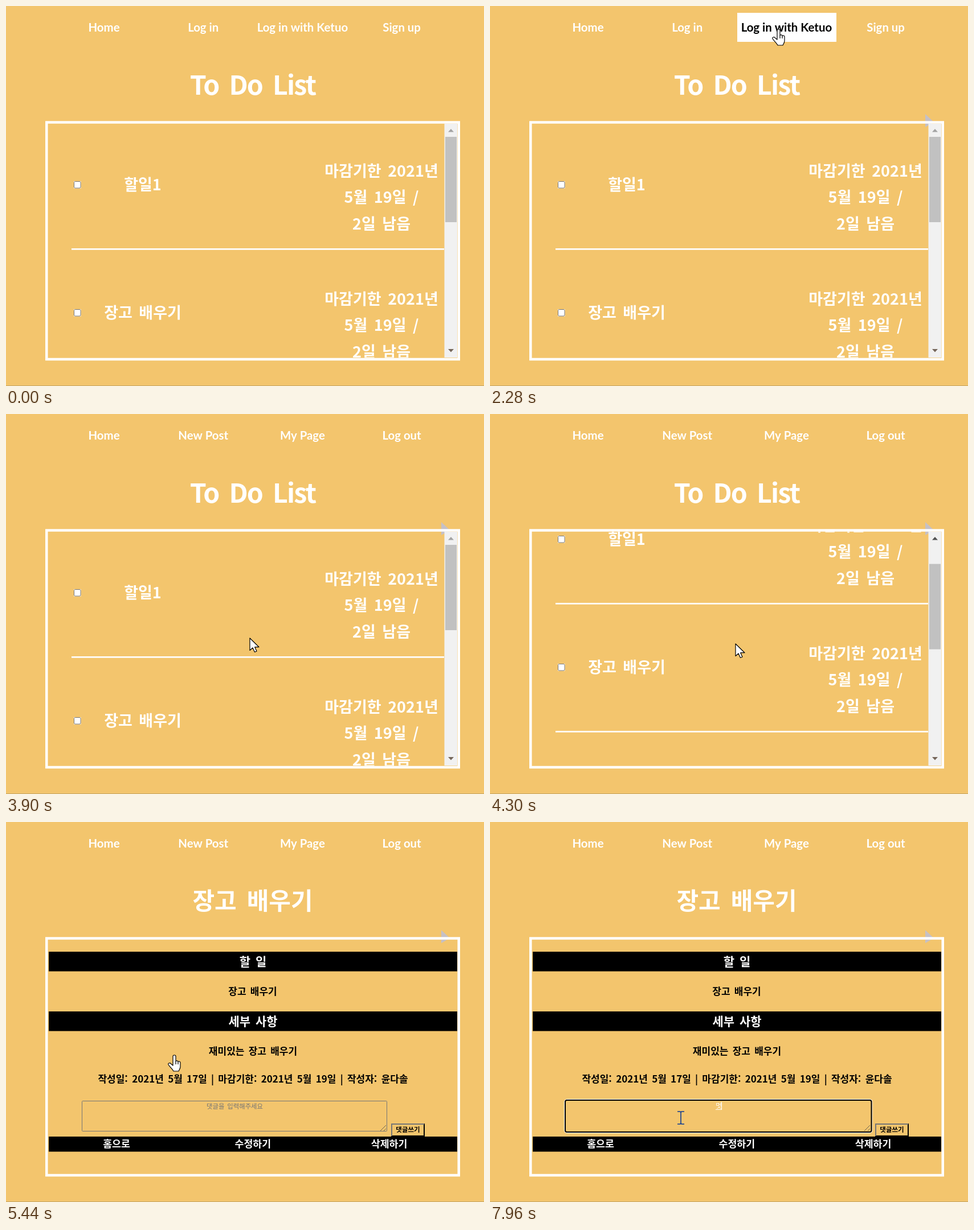
Animation, 839 px wide and 668 px high, one loop 8000 ms. Source, as an HTML page with a canvas:

```html
<!DOCTYPE html>
<html lang="ko">
<head>
<meta charset="utf-8">
<title>To Do List</title>
<style>
  html, body { margin: 0; width: 100%; height: 100%; overflow: hidden; background: #f3c56d; }
  canvas { display: block; width: 100%; height: 100%; }
</style>
</head>
<body>
<canvas id="stage" width="839" height="668"></canvas>
<script>
const ctx = document.getElementById('stage').getContext('2d');
const LOOP = 8000;
const BG = '#f3c56d';
const KR = '"Noto Sans CJK KR", "Noto Sans CJK", sans-serif';
const NAV = 'Lato, "Open Sans", sans-serif';

const LOGIN = 3170, DETAIL = 5440, FOCUS = 6300, TYPED = 6900;

// Pointer moves: start, end, position after each step
const moves = [
  [1070, 1760, [[815, 211], [764, 190], [712, 161], [660, 131], [615, 109], [575, 91],
                [545, 77], [526, 68], [518, 58], [509, 46], [505, 41]]],
  [3630, 3970, [[503, 50], [489, 140], [466, 255], [444, 345], [428, 394], [431, 404]]],
  [4580, 4830, [[415, 405], [380, 408], [338, 410], [307, 411], [294, 410]]],
  [5840, 6050, [[305, 445], [330, 495], [340, 518], [343, 523]]],
  [6440, 6900, [[337, 522], [332, 522], [331, 521], [333, 520], [335, 520], [335, 520], [335, 520]]]
];
const clicks = [[2150, 2280], [5110, 5240], [FOCUS, 6575]];

const arrow = new Path2D('M0 0V21.5L5 17L8.5 24.5L12 23L8.7 15.7H16Z');
const hand = new Path2D('M-1 2C-1 -1 4 -1 4 2V11C4 9 8 9 8 12C8 10 12 10.5 12 13V20' +
  'C12 24 10 25 9 28H0C-1 25 -7 20 -9 16.5C-10 13.5 -6 12.5 -4 15.5L-1 18Z');
const fingers = new Path2D('M4 11V16M8 12V16');
const beam = new Path2D('M-6 -11H-1.5L0 -10L1.5 -11H6M0 -10V10M-6 11H-1.5L0 10L1.5 11H6');

const within = (t, a, b) => t >= a && t < b;

function rect(x, y, w, h, color) {
  ctx.fillStyle = color;
  ctx.fillRect(x, y, w, h);
}

function frame(x, y, w, h, line, color, radius = 0) {
  ctx.beginPath();
  ctx.roundRect(x, y, w, h, radius);
  ctx.lineWidth = line;
  ctx.strokeStyle = color;
  ctx.stroke();
}

// Text centred on (x, y); word and letter spacing in em
function text(str, x, y, size, { color = '#fff', font = KR, weight = 700, words = 0.2, letters = 0 } = {}) {
  ctx.font = `${weight} ${size}px ${font}`;
  ctx.wordSpacing = words * size + 'px';
  ctx.letterSpacing = letters * size + 'px';
  ctx.textAlign = 'center';
  ctx.fillStyle = color;
  ctx.fillText(str, x, y + size * 0.375);
}

function triangle(color, ...p) {
  ctx.beginPath();
  ctx.moveTo(p[0], p[1]);
  ctx.lineTo(p[2], p[3]);
  ctx.lineTo(p[4], p[5]);
  ctx.fillStyle = color;
  ctx.fill();
}

function pointer(t) {
  let pos = null;
  for (const [start, end, steps] of moves) {
    if (t < start) break;
    const i = Math.floor((t - start + 2) / (end - start) * (steps.length - 1));
    pos = steps[Math.min(i, steps.length - 1)];
  }
  return pos;
}

function scrollTop(t) {
  if (t < 4230) return 0;
  if (t < 4300) return 32;
  return t < 4370 ? 94 : 137;
}

function nav(t, hover) {
  const items = t < LOGIN
    ? ['Home', 'Log in', 'Log in with Ketuo', 'Sign up']
    : ['Home', 'New Post', 'My Page', 'Log out'];
  if (hover) rect(434, 12, 174, 51, '#fff');
  items.forEach((label, i) => {
    const color = hover && i === 2 ? '#000' : '#fff';
    text(label, 172 + i * 174.2, 37.5, 20.4, { font: NAV, color, words: 0 });
  });
}

function row(name, y, hover) {
  if (hover) rect(136, y - 23, 209, 47, '#fff');
  rect(119, y - 6, 12.5, 12.5, '#fff');
  frame(119.5, y - 5.5, 11.5, 11.5, 1, '#767676', 2);
  text(name, 240, y, 27, { color: hover ? '#000' : '#fff' });
  ['마감기한 2021년', '5월 19일 /', '2일 남음'].forEach((line, i) =>
    text(line, 659, y - 24.5 + i * 46.5, 27));
  rect(115, y + 112, 654, 2.7, '#fff');
}

function scrollbar(top) {
  rect(769.5, 207, 22.5, 411, '#f1f1f1');
  rect(771, 230 + top * 0.357, 20, 150, '#c1c1c1');
  triangle(top ? '#505050' : '#a3a3a3', 776, 221.5, 781, 216, 786, 221.5);
  triangle('#75665a', 776, 603, 781, 608.5, 786, 603);
}

function listPage(t, hover) {
  const top = scrollTop(t);
  text('To Do List', 433, 139, 46.5, { letters: -0.04 });
  ctx.save();
  ctx.beginPath();
  ctx.rect(74, 207, 718, 411.5);
  ctx.clip();
  ['할일1', '장고 배우기', '할일2'].forEach((name, i) =>
    row(name, 314 + i * 225 - top, hover && i === 1));
  scrollbar(top);
  ctx.restore();
}

function commentBox(t) {
  if (t < FOCUS) {
    frame(133.5, 490.5, 535, 53, 1, '#767676', 1);
  } else {
    frame(130.5, 487.5, 540.5, 59, 1, '#fff', 4);
    frame(132, 489, 537.5, 56, 2, '#000', 3);
  }
  ctx.beginPath();
  ctx.moveTo(657, 543); ctx.lineTo(667, 533);
  ctx.moveTo(663, 543); ctx.lineTo(667, 539);
  ctx.lineWidth = 1;
  ctx.strokeStyle = '#6b6250';
  ctx.stroke();

  if (t < TYPED) {
    text('댓글을 입력해주세요', 401.5, 500, 11.4, { color: '#757575', weight: 500 });
    if (within(t, FOCUS, 6825)) rect(401, 492, 1, 14, '#fff');
    return;
  }
  const glyph = t < 7830 ? 'ㅁ' : t < 7960 ? '머' : '멋';
  text(glyph, 401.5, 499, 11.6, { weight: 500 });
  rect(396, 505, 11, 1, '#fff');
  if (!within(t, 7430, 7830)) rect(406, 492, 1, 14, '#fff');
}

function detailPage(t) {
  const dark = { color: '#000' };
  text('장고 배우기', 433, 138, 42);
  rect(75, 228, 717, 34.5, '#000');
  text('할 일', 433.5, 245, 21, { weight: 900 });
  text('장고 배우기', 433, 298, 17, dark);
  rect(75, 333, 717, 34.5, '#000');
  text('세부 사항', 433.5, 350, 21, { weight: 900 });
  text('재미있는 장고 배우기', 433.5, 403, 17, dark);
  text('작성일: 2021년 5월 17일 | 마감기한: 2021년 5월 19일 | 작성자: 윤다솔', 433.5, 452, 17, dark);
  commentBox(t);

  frame(677, 531, 57, 21, 2, '#000');
  rect(676, 530, 58, 2, '#767676');
  rect(676, 530, 2, 22, '#767676');
  text('댓글쓰기', 705.5, 541, 11.5, dark);

  rect(75, 553, 717, 26.5, '#000');
  ['홈으로', '수정하기', '삭제하기'].forEach((label, i) =>
    text(label, 194 + i * 239.3, 565.5, 17.3));
}

function drawPointer(t, [x, y], kind) {
  ctx.save();
  ctx.translate(x, y);
  ctx.lineJoin = 'round';
  ctx.fillStyle = '#fff';
  ctx.strokeStyle = '#000';
  ctx.lineWidth = 1.2;
  if (kind === 'beam') {
    ctx.strokeStyle = '#0c3a92';
    ctx.lineWidth = 1.6;
    ctx.stroke(beam);
  } else {
    const shape = kind === 'hand' ? hand : arrow;
    ctx.fill(shape);
    ctx.stroke(shape);
    if (kind === 'hand') ctx.stroke(fingers);
  }
  if (clicks.some(([a, b]) => within(t, a, b))) {
    ctx.beginPath();
    ctx.arc(-1, -0.5, 16.5, 0, Math.PI * 2);
    ctx.fillStyle = 'rgba(250, 230, 40, 0.78)';
    ctx.fill();
  }
  ctx.restore();
}

function draw(t) {
  const pos = pointer(t);
  const overNav = pos && pos[1] < 63;
  const overItem = pos && within(t, 4580, DETAIL) && pos[0] < 345;
  const overBox = pos && t >= DETAIL && pos[1] > 488;

  rect(0, 0, 839, 668, BG);
  rect(0, 667, 839, 1, '#c4a464');
  nav(t, overNav && !within(t, LOGIN, 3630));

  // Faint mark the pointer leaves by the corner
  if (t >= 1140) triangle('#c5c0c6', 764, 190, 764, 213, 779, 204);
  frame(71.25, 204.6, 723.5, 416.5, 4.5, '#fff');

  if (t < DETAIL) listPage(t, overItem);
  else detailPage(t);

  if (!pos) return;
  const held = within(t, DETAIL, 5840);
  const kind = overBox ? 'beam' : overNav || overItem || held ? 'hand' : 'arrow';
  drawPointer(t, pos, kind);
}

const begin = performance.now();
function tick() {
  draw((performance.now() - begin) % LOOP);
  requestAnimationFrame(tick);
}
tick();
</script>
</body>
</html>
```
